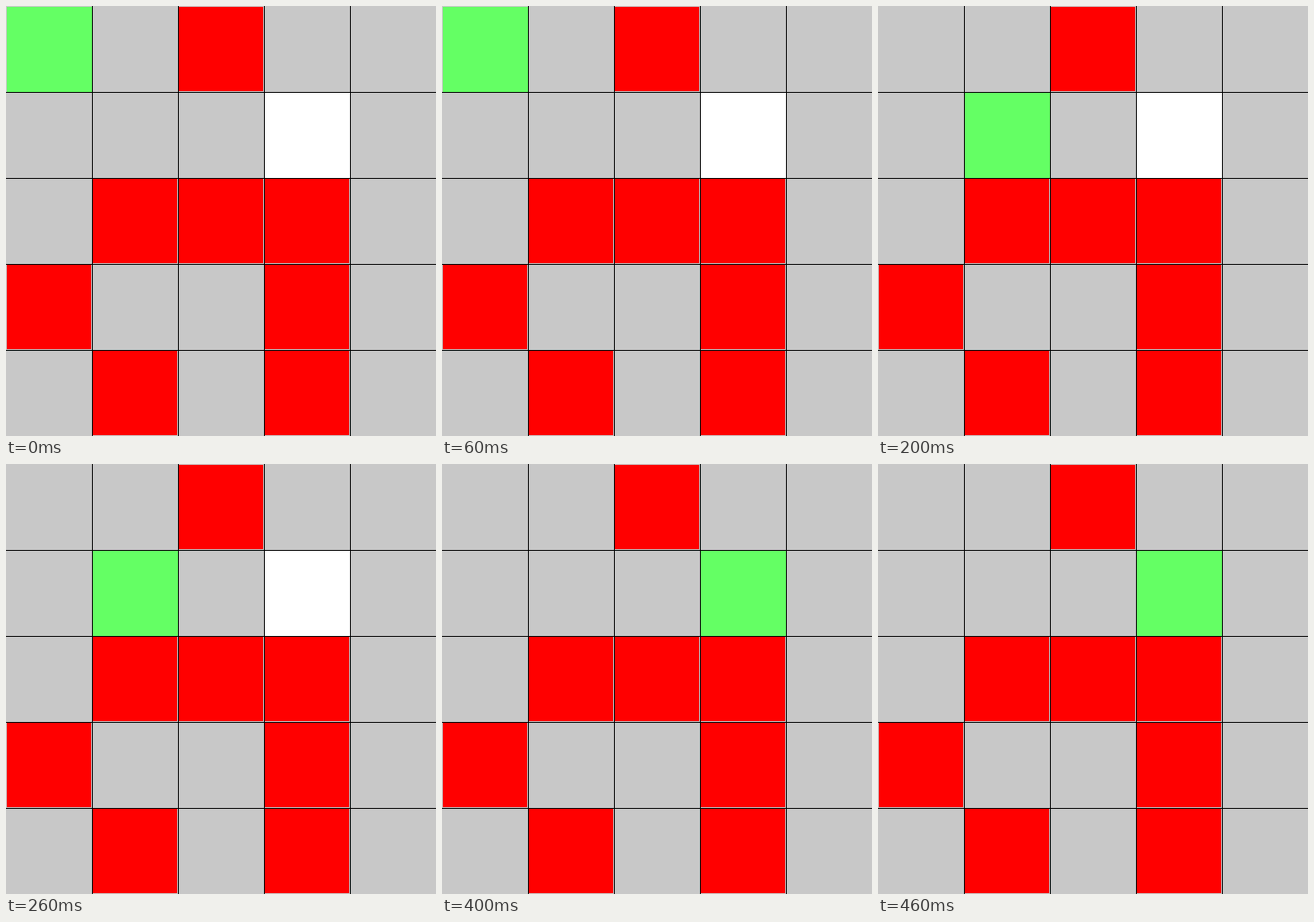
An HTML page for the animation above (0.5 s loop, 500 by 500 pixels).

```html
<!DOCTYPE html>
<html lang="en">
<head>
<meta charset="utf-8">
<title>Grid walk</title>
<style>
  html, body { margin: 0; width: 100%; height: 100%; overflow: hidden; background: #c8c8c8; }
  svg { display: block; width: 500px; height: 500px; shape-rendering: crispEdges; }
  .wall { fill: #f00; }
  .goal { fill: #fff; }
  .walker { fill: #64ff64; animation: walk 500ms step-end infinite; }
  @keyframes walk {
    0%   { transform: translate(0, 0); }
    20%  { transform: translate(0, 100px); }
    40%  { transform: translate(100px, 100px); }
    60%  { transform: translate(200px, 100px); }
    80%  { transform: translate(300px, 100px); }
    100% { transform: translate(0, 0); }
  }
</style>
</head>
<body>
<svg viewBox="0 0 500 500">
  <defs><rect id="wall" x="1" y="1" width="98" height="98"/></defs>
  <path d="M100 0h1v500h-1zM200 0h1v500h-1zM300 0h1v500h-1zM400 0h1v500h-1z
           M0 100h500v1H0zM0 200h500v1H0zM0 300h500v1H0zM0 400h500v1H0z"/>
  <g class="wall">
    <use href="#wall" x="200"/>
    <use href="#wall" x="100" y="200"/>
    <use href="#wall" x="200" y="200"/>
    <use href="#wall" x="300" y="200"/>
    <use href="#wall" y="300"/>
    <use href="#wall" x="300" y="300"/>
    <use href="#wall" x="100" y="400"/>
    <use href="#wall" x="300" y="400"/>
  </g>
  <rect class="goal" x="301" y="101" width="99" height="99"/>
  <rect class="walker" x="1" y="1" width="99" height="99"/>
</svg>
</body>
</html>
```
